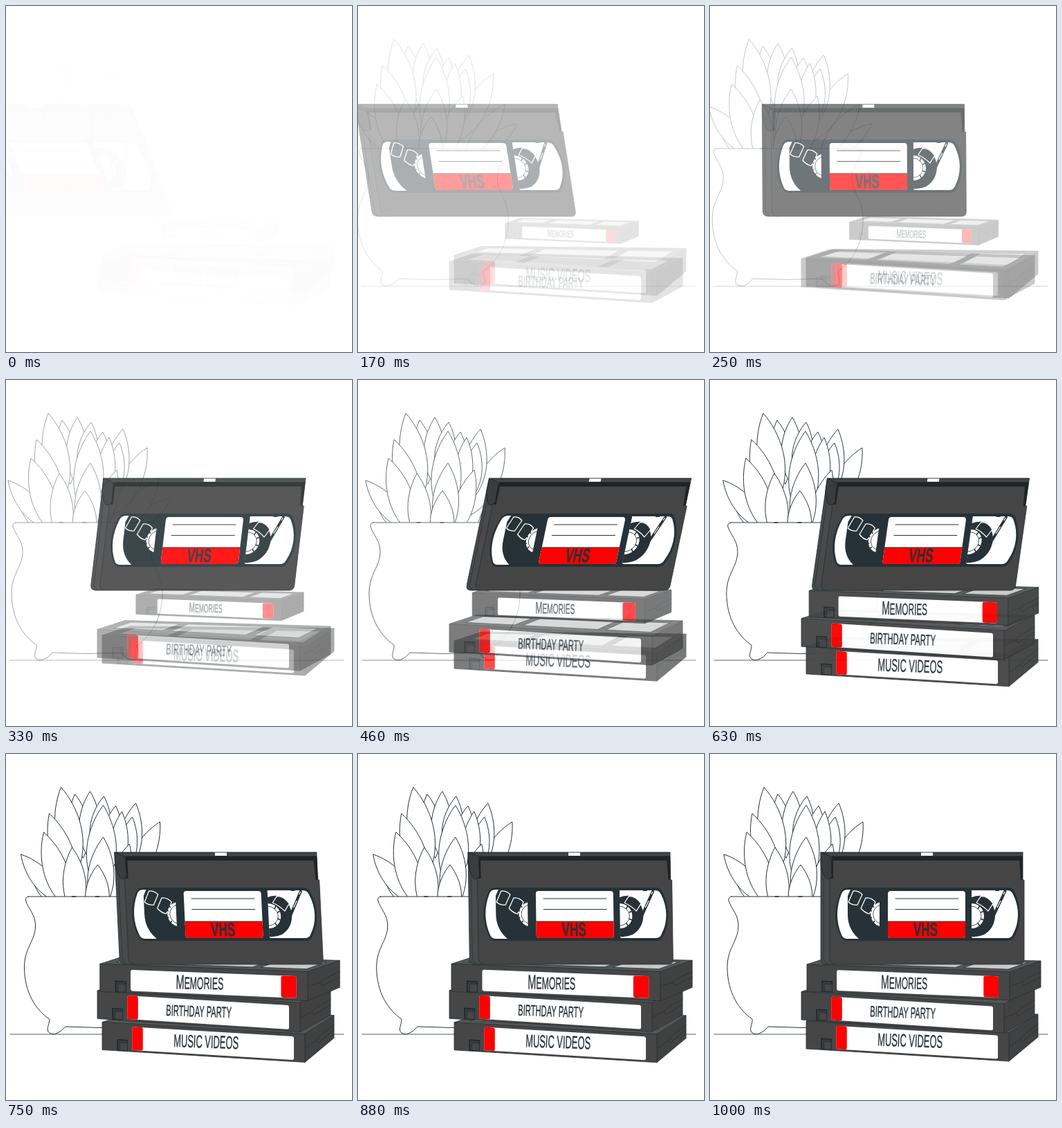
Recreate the animation shown at these times as an HTML page. Size 500 by 500 pixels, loop 1040 ms.

```html
<!DOCTYPE html>
<html lang="en">
<head>
<meta charset="utf-8">
<title>Video tapes</title>
<style>
  html, body { margin: 0; width: 100%; height: 100%; overflow: hidden; background: #fff; }
  svg { display: block; width: 100%; height: 100%; }
  .line { fill: none; stroke: #263238; stroke-width: .8; stroke-linecap: round; stroke-linejoin: round; }
  .sheet { fill: #fff; stroke-width: 1; }
  .paper { fill: #fff; }
  .ink { fill: #263238; }
  .hand { font-family: "Liberation Sans", Arial, sans-serif; fill: #263238; stroke: #263238; stroke-width: .4; }
  .bold { font-weight: 700; }
</style>
</head>
<body>
<svg viewBox="0 0 500 500">
  <path id="ground" class="line" d="M6 405H488"/>
  <g id="plant"></g>
  <g id="music"></g>
  <g id="birthday"></g>
  <g id="memories"></g>
  <g id="tape">
    <path fill="#454545" stroke="#263238" stroke-width=".8"
      d="M160 142H452V182H454V297Q454 304 447 304H168Q160 304 160 296Z"/>
    <path fill="#4a4a4a" d="M161 181H172V294Q172 302 178 303H168Q161 303 161 296Z"/>
    <path class="line" d="M173 181V294Q173 302 180 304M164 181V296Q165 301 169 303"/>
    <path fill="#202426" d="M176 147.500H452V154H178V180H174ZM447 153H452V182H449Z"/>
    <path fill="#3a3c3d" stroke="#1d2224" stroke-width=".8" d="M160 142L175 148L176 176Q174 182 168 180Q163 176 160 160Z"/>
    <path class="line" style="stroke-width:1.200" d="M160 142.500H452"/>
    <path class="paper" d="M305 142.500H322V147H305Z"/>

    <path class="ink" d="M198 193H431Q438 193 441 201Q448 217 448 232Q448 248 441 262Q438 270 431 270H198Q191 270 188 262Q181 248 181 232Q181 217 188 201Q191 193 198 193Z"/>
    <path class="paper" d="M199 196Q192 196 190 202Q184 217 184 232Q184 247 190 261Q192 267 199 267H215Q199 253 199 232ZM199 196H203L199 205Z"/>
    <path class="paper" d="M378 197H429Q436 197 438 203Q445 217 445 232Q445 247 438 260Q436 266 429 266H382Q378 266 378 264Z"/>
    <path class="ink" d="M378 207Q389 203 398 206Q412 217 412 234Q411 252 396 261Q387 265 378 264Z"/>
    <path d="M427 197L405 244" stroke="#263238" stroke-width="4"/>
    <path d="M420 212L415 222M426 199L424 203" stroke="#fff" stroke-width="1.200"/>
    <path d="M412 197H418" stroke="#263238" stroke-width="2"/>
    <g fill="#263238" stroke="#fff" stroke-width="1.300" stroke-linejoin="round">
      <path d="M207 198Q214 197 220 203L213 218Q206 219 200 214Z"/>
      <path d="M225 208Q233 207 239 214L234 226L230 231Q223 229 218 223Z"/>
      <path d="M391 206Q400 204 409 216L402 227Q394 219 385 215Z"/>
    </g>
    <path class="paper" d="M246 214A18 18 0 0 0 246 249ZM378 216A18 18 0 0 1 378 252Z"/>
    <path class="line" d="M246 218A14 14 0 0 0 246 245M378 220A14 14 0 0 1 378 248"/>
    <path d="M234 217L237 222M229 225L234 227M229 238L234 236M235 246L238 241M390 219L387 224M396 227L391 229M396 240L391 238M390 249L387 244" stroke="#263238" stroke-width="1.500"/>
    <path class="ink" d="M245 194H257V269H245ZM369 194H378V269H369Z"/>

    <rect class="paper" x="257" y="198" width="112" height="68" rx="4"/>
    <path fill="#f00" d="M257 242H369V262Q369 266 365 266H261Q257 266 257 262Z"/>
    <path class="line" style="stroke-width:1" d="M268 209H359M268 224.500H359M257 242H369"/>
    <g id="format"></g>
  </g>
</svg>
<script>
const $ = id => document.getElementById(id);
const mix = (a, b, t) => a + (b - a) * t;

// ---------- drawing ----------
const path = (d, attrs = 'class="line"') => `<path d="${d}" ${attrs}/>`;
const poly = pts => 'M' + pts.map(p => p.map(n => n.toFixed(1)).join(' ')).join('L') + 'Z';

// One narrow lettering style shared by every label
const lettering = (x, y, size, content, { narrow = .5, tilt = 2, cls = '' } = {}) =>
  `<text class="hand ${cls}" font-size="${size}" transform="translate(${x} ${y}) rotate(${tilt}) scale(${narrow} 1)">${content}</text>`;

function leaf(tx, ty, bx, by, w) {
  const dx = tx - bx, dy = ty - by, len = Math.hypot(dx, dy);
  const at = (along, side) =>
    `${(bx + dx * along - dy / len * side).toFixed(1)} ${(by + dy * along + dx / len * side).toFixed(1)}`;
  const d = `M${bx} ${by}C${at(.35, w * 1.33)} ${at(.75, w * .85)} ${tx} ${ty}` +
            `C${at(.75, -w * .85)} ${at(.35, -w * 1.33)} ${bx} ${by}Z`;
  return path(d, 'class="line sheet"');
}

function drawPlant() {
  const leaves = [
    [98, 58, 110, 150, 17], [120, 54, 118, 150, 18], [140, 61, 130, 150, 18],
    [157, 75, 147, 160, 17], [256, 170, 190, 222, 13], [238, 142, 180, 222, 16],
    [221, 98, 172, 195, 19], [186, 71, 168, 180, 21], [181, 91, 166, 180, 17],
    [166, 83, 157, 180, 16], [78, 48, 100, 175, 23], [139, 74, 134, 205, 26],
    [61, 86, 98, 200, 20], [31, 161, 68, 224, 9], [20, 145, 82, 218, 17],
    [53, 113, 88, 225, 21], [177, 130, 148, 228, 17], [139, 120, 132, 235, 23],
    [94, 135, 101, 240, 20], [131, 160, 130, 250, 21]
  ];
  const pot = 'M31 206H237Q243 207 241 212C237 224 227 232 227 248C227 270 243 280 243 308' +
    'C243 345 226 370 207 383C206 390 212 397 208 402Q203 406 196 404Q189 402 184 394' +
    'Q134 397 84 394Q78 402 71 404Q64 406 60 402C56 397 62 390 61 383' +
    'C42 370 25 345 25 308C25 280 41 270 41 248C41 232 31 224 27 212Q26 207 31 206Z';
  return leaves.map(l => leaf(...l)).join('') + path(pot, 'class="line sheet"') +
    path('M94 206H99M128 206H133', 'class="line" style="stroke-width:1.600"');
}

// A lying cassette: heights of the front corners, then the far right edge
function drawBox({ x, tl, bl, tr, br, depth, farTop, farBottom, red, v = [.14, .91] }) {
  const right = x + 293;
  const quad = (a, b, c, d) => (u, w) => [0, 1].map(i => mix(mix(a[i], b[i], u), mix(d[i], c[i], u), w));
  const front = quad([x, tl], [right, tr], [right, br], [x, bl]);
  const side = quad([right, tr], [right + depth, farTop], [right + depth, farBottom], [right, br]);
  const top = quad([x + 40, tl - 13], [right + depth, farTop], [right, tr], [x, tl]);
  const area = (f, u0, u1, v0, v1) => poly([f(u0, v0), f(u1, v0), f(u1, v1), f(u0, v1)]);
  const filled = color => `fill="${color}" stroke="#263238" stroke-width=".8" stroke-linejoin="round"`;
  const rounded = color => `fill="${color}" stroke="${color}" stroke-width="5" stroke-linejoin="round"`;
  const line = (f, ...pts) => path(poly(pts.map(p => f(...p))).replace('Z', ''));
  return path(area(top, 0, 1, 0, 1), filled('#555')) +
    [[.05, .29], [.33, .7], [.74, .96]].map(([a, b]) => path(area(top, a, b, .15, .78), filled('#c9c9c9'))).join('') +
    path(area(side, 0, 1, 0, 1), filled('#414141')) +
    line(side, [0, .5], [.4, .53], [.55, .45], [1, .42]) +
    line(side, [.4, .53], [.45, .68], [1, .62]) +
    path(area(front, 0, 1, 0, 1), filled('#464646')) +
    path(area(front, .075, .124, .6, .97), 'fill="#3a3a3a" stroke="#20282b" stroke-width="1.500"') +
    path(area(front, .088, .124, .7, .97), filled('#464646')) +
    path(area(front, .156, .937, v[0] + .03, v[1] - .03), rounded('#fff')) +
    path(area(front, ...red, v[0] + .03, v[1] - .03), rounded('#f00'));
}

$('plant').innerHTML = drawPlant();
$('music').innerHTML = drawBox({ x: 139, tl: 386, bl: 426, tr: 403, br: 444, depth: 42, farTop: 376, farBottom: 409, red: [.156, .192] }) +
  lettering(242, 421.5, 25.8, 'MUSIC VIDEOS');
$('birthday').innerHTML = drawBox({ x: 132, tl: 343.5, bl: 384, tr: 361, br: 403, depth: 44, farTop: 339, farBottom: 379, red: [.156, .192] }) +
  lettering(231, 379.5, 22.4, 'BIRTHDAY PARTY');
$('memories').innerHTML = drawBox({ x: 140, tl: 304, bl: 343, tr: 315, br: 356, depth: 45, farTop: 299, farBottom: 337, red: [.88, .937], v: [.2, .89] }) +
  lettering(247, 339, 28, 'M<tspan font-size="24">EMORIES</tspan>', { tilt: .8 });
$('format').innerHTML = lettering(294, 263, 27.5, 'VHS', { narrow: .62, tilt: 0, cls: 'bold' });

// ---------- motion ----------
const LOOP = 1040, FPS = 24;

// cubic-bezier(.36, -.01, .5, 1.38)
function ease(x) {
  if (x <= 0) return 0;
  if (x >= 1) return 1;
  const curve = (s, a, b) => 3 * (1 - s) ** 2 * s * a + 3 * (1 - s) * s * s * b + s ** 3;
  let lo = 0, hi = 1;
  for (let i = 0; i < 24; i++) {
    const mid = (lo + hi) / 2;
    if (curve(mid, .36, .5) < x) lo = mid; else hi = mid;
  }
  return curve(lo, -.01, 1.38);
}

function pose(id, opacity, transform = '') {
  $(id).setAttribute('opacity', Math.max(0, Math.min(1, opacity)).toFixed(4));
  $(id).setAttribute('transform', transform);
}

// The tape shoots in leaning back, brakes forward, then settles
function tapePose(t) {
  const tan = deg => Math.tan(deg * Math.PI / 180);
  const entry = ease(t / 600);
  const lean = t < 600 ? mix(tan(20), tan(-10), entry)
    : t < 800 ? mix(tan(-10), tan(2), ease((t - 600) / 200))
    : mix(tan(2), 0, ease((t - 800) / 200));
  const pivot = 209;
  const shift = -250 * (1 - entry) - pivot * lean;
  pose('tape', entry, `matrix(1 0 ${lean.toFixed(5)} 1 ${shift.toFixed(3)} 0)`);
}

function render(ms) {
  const step = Math.floor((ms % LOOP + 5) * FPS / 1000);
  const shown = step < 2 ? 0 : Math.round(step * 100 / FPS) * 10;
  const t = 34 + .966 * shown;
  const p = ease(t / 1000), offset = 30 * (1 - p);
  pose('ground', p);
  pose('plant', p, `translate(${-offset} 0)`);
  pose('music', p, `translate(0 ${-offset})`);
  pose('birthday', p, `translate(0 ${offset})`);
  pose('memories', p, `translate(309 327) scale(${.5 + .5 * p}) translate(-309 -327)`);
  tapePose(t);
}

const start = performance.now();
function tick() {
  render(performance.now() - start);
  requestAnimationFrame(tick);
}
tick();
</script>
</body>
</html>
```
